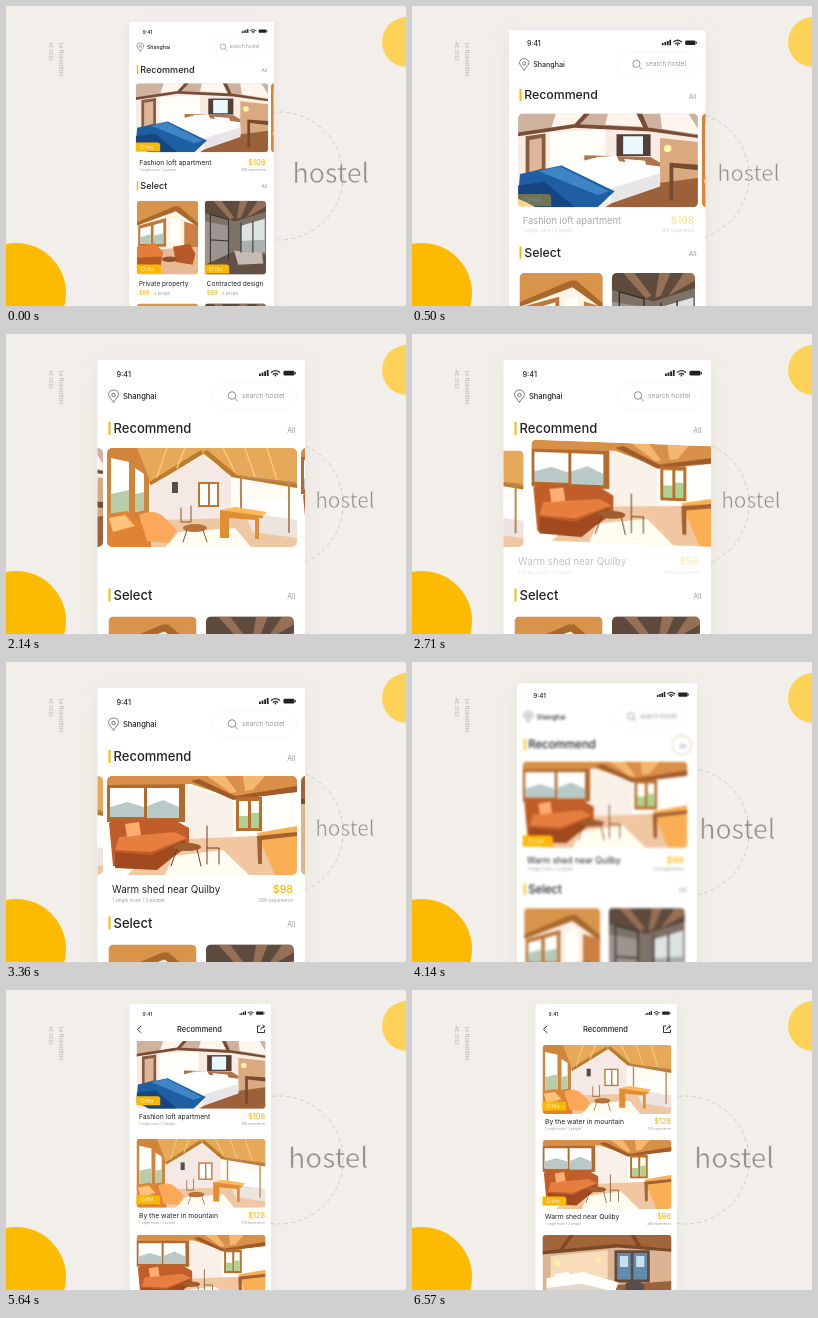
An HTML page for the animation above (7 s loop, 400 by 300 pixels).

```html
<!DOCTYPE html>
<html lang="en">
<head>
<meta charset="utf-8">
<title>Hostel app</title>
<style>
html, body { margin: 0; width: 100%; height: 100%; overflow: hidden; background: #f2efea; }
svg { display: block; width: 400px; height: 300px; font-family: Inter, sans-serif; fill: #222; }
.light { font-family: "Noto Sans CJK SC", "Noto Sans CJK JP", "Noto Sans CJK", "Noto Sans", sans-serif; font-weight: 300; fill: #938f8a; }
#word { stroke: #f2efea; stroke-width: .55px; }
.head { font-size: 13px; font-weight: 500; }
.mute { fill: #999; }
.gold { fill: #fbb800; }
.price { fill: #fbb800; font-weight: 500; }
.end { text-anchor: end; }
.line { fill: none; stroke: #333; stroke-linecap: round; stroke-linejoin: round; }
.photo { filter: blur(.6px) brightness(1.1) saturate(1.1); }
</style>
</head>
<body>
<svg viewBox="0 0 400 300">
<defs>
  <clipPath id="screen"><rect x="91.5" y="26" width="207.5" height="460" rx="2"/></clipPath>
  <clipPath id="wide"><rect width="190" height="99" rx="5"/></clipPath>
  <clipPath id="tall"><rect width="88" height="106" rx="5"/></clipPath>
  <clipPath id="listArea"><rect x="120" y="51" width="150" height="260"/></clipPath>

  <g id="bedroom">
    <path fill="#e0d6cf" d="M0 0H190V99H0z"/>
    <path fill="#b9a292" d="M0 0H190V24L140 16 60 12 0 22z"/>
    <path fill="#e6dfd9" d="M40 0H70L62 11 35 15zM95 0H125L132 14 92 12zM150 0H180L190 16V22L152 16z"/>
    <path fill="#6b4733" d="M70 0H76L64 13H58zM125 0H131L138 16H133zM0 20L60 11 140 15 190 23V26L140 19 60 15 0 24z"/>
    <path fill="#ece6e1" d="M34 20L92 17V48L34 56z"/>
    <path fill="#7a543c" d="M8 24L29 21V62L8 68z"/>
    <path fill="#c6a68e" d="M12 28L25 26V58L12 62z"/>
    <path fill="#4a3a33" d="M104 22H140V45H104z"/>
    <path fill="#d5e1e6" d="M111 24H132V43H111z"/>
    <path fill="#c39a78" d="M150 26L190 30V99H150z"/>
    <path fill="#8a5938" d="M128 76L190 68V99H92z"/>
    <path fill="#9b6a49" d="M70 44L140 46 150 52V62L70 52z"/>
    <path fill="#f1efee" d="M38 58L80 47 150 56V76L98 94 60 70z"/>
    <path fill="#d2d0d2" d="M98 79L150 63V77L98 95z"/>
    <path fill="#fff" d="M82 46L104 45 108 53 86 54zM112 48L134 50 136 58 116 56z"/>
    <path fill="#20568f" d="M2 64L46 55 102 82 84 99H18L0 88z"/>
    <path fill="#173f70" d="M0 76L28 72 60 99H20L0 90z"/>
    <path fill="#3d78ae" d="M22 61L44 56 96 82 84 86z"/>
    <path fill="#68452f" d="M160 52L190 54V60L164 57V92H160z"/>
    <circle cx="158" cy="37" r="4" fill="#ffe0a0"/>
  </g>

  <g id="studio">
    <path fill="#ece5df" d="M0 0H190V99H0z"/>
    <path fill="#cc9a58" d="M18 0H190V38L124 27 96 6 44 36 30 20z"/>
    <path fill="#a6712f" d="M96 4L100 2 130 27 190 36V40L124 29zM96 6L44 38 42 34 94 2z"/>
    <path class="line" style="stroke:#dfb674;stroke-width:1.5" d="M60 0L50 29M78 0L70 20M116 0L128 24M138 0L148 29M160 0L170 32"/>
    <path fill="#b97a3c" d="M0 0H30L42 30V74H0z"/>
    <path fill="#edf3f3" d="M4 10L22 14V68L4 72zM28 20L37 26V62L28 64z"/>
    <path fill="#a9b99c" d="M4 46L22 42V68L4 72zM28 46L37 44V62L28 64z"/>
    <path fill="#ddd4d0" d="M44 37L96 8 124 28V70L44 74z"/>
    <path fill="#a66c37" d="M91 34H112V59H91z"/>
    <path fill="#e6eff1" d="M93 36H101V57H93zM103 36H110V57H103z"/>
    <path fill="#4f4742" d="M65 34H71V45H65z"/>
    <path fill="#d6b698" d="M54 72L190 68V99H40z"/>
    <path fill="#efe5dc" d="M72 84L128 80 144 99H58z"/>
    <path fill="#f1edeb" d="M136 53L190 50V88L146 82z"/>
    <path fill="#d6cfcb" d="M136 64L190 72V90L146 84z"/>
    <path class="line" style="stroke:#a77b52;stroke-width:2" d="M134 28V62M182 34V84M134 29L188 35"/>
    <path fill="#c78237" d="M113 62L156 66V70L152 70V91H148V72L122 70V90H113z"/>
    <path fill="#e0a95e" d="M113 62L128 59 160 64 156 68z"/>
    <path fill="#c57838" d="M0 66L20 63 33 74 44 80V99H0z"/>
    <path fill="#df9a59" d="M32 67Q48 60 58 70L70 82 62 95 40 93z"/>
    <path fill="#eab277" d="M2 70L18 67 28 78 6 84z"/>
    <ellipse cx="88" cy="80" rx="12" ry="4" fill="#a2693b"/>
    <path class="line" style="stroke:#7d4d2b" d="M80 82L76 94M96 82L100 94M74 60V74H84V58"/>
  </g>

  <g id="lounge">
    <path fill="#efe9e5" d="M0 0H190V99H0z"/>
    <path fill="#bf8348" d="M0 0H190V16L126 22 84 8 0 10z"/>
    <path fill="#8d542a" d="M84 5L92 3 128 20 190 10V16L126 24z"/>
    <path fill="#d9a76e" d="M100 0H118L130 16 124 17zM136 0H158L146 14 138 15z"/>
    <path fill="#9e622f" d="M0 9L78 8V46H0z"/>
    <path fill="#e9f1f6" d="M3 12H37V41H3zM40 12H72V42H40z"/>
    <path fill="#a9b6b5" d="M3 31L20 26 37 31V41H3zM40 30L56 24 72 31V42H40z"/>
    <path fill="#e2dad4" d="M78 8L126 24V64H78z"/>
    <path fill="#a4642f" d="M129 21H155V55H129z"/>
    <path fill="#e6f0e4" d="M132 25H141V52H132zM144 25H152V52H144z"/>
    <path fill="#9fbd88" d="M132 40H141V52H132zM144 37H152V52H144z"/>
    <path fill="#d8b597" d="M60 64L190 58V99H20z"/>
    <path fill="#f1e6da" d="M66 80L116 74 142 99H58z"/>
    <path fill="#a9562a" d="M2 47Q12 41 26 44L66 43 82 52V70L50 92 6 90z"/>
    <path fill="#c97440" d="M12 61L68 56 80 62 44 76 8 74z"/>
    <path fill="#8c4421" d="M8 76L44 79 78 64V71L50 94 8 92z"/>
    <path fill="#e1a06b" d="M18 48L32 46 34 59 20 61z"/>
    <path fill="#dfa055" d="M150 57L190 50V99H168z"/>
    <path fill="#8f5a32" d="M150 60L190 56V60L155 64V88H151z"/>
    <ellipse cx="80" cy="71" rx="14" ry="4" fill="#8c5630"/>
    <path class="line" style="stroke:#5f3921" d="M70 73L64 90M90 73L94 90M100 50V72H112V88M100 72V88"/>
  </g>

  <g id="cabin">
    <path fill="#c4a488" d="M0 0H190V99H0z"/>
    <path fill="#8e5d38" d="M0 0H190V22L110 16 0 26z"/>
    <path fill="#6c4327" d="M0 23L110 13 190 20V24L110 18 0 28zM40 0H46L30 22H24zM130 0H136L146 17H140z"/>
    <path fill="#dfc8ae" d="M12 30L96 22V62L12 66z"/>
    <path fill="#5a4436" d="M106 22H158V68H106z"/>
    <path fill="#5b7f9b" d="M110 26H130V64H110zM134 26H154V64H134z"/>
    <path fill="#b7cbd6" d="M114 30H126V46H114zM138 30H150V46H138z"/>
    <path fill="#885a3b" d="M50 76L190 66V99H50z"/>
    <path fill="#ede8e4" d="M6 62L60 53 112 68 100 99H6z"/>
    <path fill="#cfc4bb" d="M6 76L58 70 108 82 100 99H6z"/>
    <path fill="#fff" d="M18 56L38 53 42 62 22 65z"/>
    <path fill="#4e4744" d="M122 70Q136 60 150 72V99H122z"/>
    <circle cx="22" cy="40" r="4" fill="#ffdb91"/><circle cx="82" cy="36" r="4" fill="#ffdb91"/>
  </g>

  <g id="sunny" clip-path="url(#tall)"><g class="photo">
    <path fill="#e8ddd4" d="M0 0H88V106H0z"/>
    <path fill="#c0874c" d="M0 0H88V34L56 12 0 32z"/>
    <path fill="#95602f" d="M54 8L60 8 88 32V38L56 15 0 36V31z"/>
    <path fill="#a86d39" d="M2 36L42 25V66H2z"/>
    <path fill="#e5eef0" d="M5 40L20 36V62H5zM24 35L38 31V62H24z"/>
    <path fill="#a7b7aa" d="M5 52L20 48V62H5zM24 50L38 47V62H24z"/>
    <path fill="#efe8e2" d="M48 28L62 24V62H48z"/>
    <path fill="#b27542" d="M68 30L88 36V78H68z"/>
    <path fill="#cfa98a" d="M0 72L88 66V106H0z"/>
    <path fill="#c7743a" d="M0 66L26 61 38 74 34 92 0 96z"/>
    <path fill="#9f5228" d="M0 82L36 80 34 94 0 100zM52 66L76 62 84 76 80 92 56 88z"/>
    <ellipse cx="47" cy="84" rx="11" ry="4" fill="#7e4b2b"/>
  </g></g>

  <g id="loft" clip-path="url(#tall)"><g class="photo">
    <path fill="#72685f" d="M0 0H88V106H0z"/>
    <path fill="#54443a" d="M0 0H88V16L44 30 0 18z"/>
    <path fill="#856650" d="M12 0H24L42 24 36 27zM50 0H62L52 24 46 26zM76 0H88V8L60 24z"/>
    <path fill="#8d8782" d="M0 30L34 36V84L0 96z"/>
    <path fill="#c9cdcd" d="M52 36L86 26V74L52 72z"/>
    <path fill="#9aa09f" d="M52 58L86 56V74L52 72z"/>
    <path fill="#5a4a40" d="M0 92L40 74 88 78V106H0z"/>
    <path fill="#b3aaa3" d="M42 72L82 74 84 90 48 92z"/>
    <path class="line" style="stroke:#2f2b29;stroke-width:1.5" d="M8 20V98M34 26V84M8 56L34 58M52 32V74M69 30V74M8 20L34 27"/>
  </g></g>

  <g id="tag">
    <path class="gold" d="M0 0H31Q35 0 35 4V13H0z"/>
    <circle cx="9" cy="6.5" r="2.6" fill="none" stroke="#fff" stroke-width=".8"/>
    <text x="14" y="9" font-size="6.5" fill="#fff">Hot</text>
  </g>
</defs>

<rect width="400" height="300" fill="#f2efea"/>
<circle cx="10" cy="287" r="50" fill="#fdbb00"/>
<circle cx="401" cy="36" r="25" fill="#fed157"/>
<g class="light" style="fill:#b5b1ac" font-size="5.6">
  <text transform="translate(52.800 36) rotate(90)">14 November</text>
  <text transform="translate(42.600 36) rotate(90)" font-size="5.2">AE 2019</text>
</g>
<circle cx="273" cy="170" r="64" fill="none" stroke="#c6c2bd" stroke-width=".8" stroke-dasharray="4 3"/>
<text id="word" class="light">hostel</text>

<g id="phone">
  <rect x="91" y="30" width="208" height="460" fill="#d9d3cb" opacity=".5" style="filter:blur(10px)"/>
  <g clip-path="url(#screen)">
    <rect x="91" y="26" width="209" height="460" fill="#fff"/>
    <g id="home">
      <path class="line" style="stroke:#555;stroke-width:.8" d="M107.500 68Q102.500 62.500 102.500 60.500A5 4.500 0 0 1 112.500 60.500Q112.500 62.500 107.500 68z"/>
      <circle cx="107.500" cy="61" r="1.700" fill="none" stroke="#555" stroke-width=".8"/>
      <text x="117" y="65" font-size="7.500" font-weight="500">Shanghai</text>
      <rect x="205.500" y="49" width="85" height="26" rx="13" fill="#fff" stroke="#f8f8f8"/>
      <circle cx="226" cy="61.500" r="3.800" fill="none" stroke="#777" stroke-width=".8"/>
      <path class="line" style="stroke:#777;stroke-width:.8" d="M229 64.500L231.500 67"/>
      <text class="mute" x="236" y="64" font-size="6.700">search hostel</text>
      <circle id="tap" cx="284.500" cy="95" r="11" fill="#fff" stroke="#eadfc9" stroke-width="1.500"/>
      <g id="heads"></g>
      <g id="slides"></g>
      <g id="captions"></g>
      <g id="select"></g>
    </g>
    <g id="detail" transform="scale(1.470588) translate(-61.420 3.436)">
      <rect x="120" y="10" width="150" height="300" fill="#fff"/>
      <g id="list" clip-path="url(#listArea)"></g>
      <path class="line" d="M135 36L131.500 39.300 135 42.600M254 36H251.500V42.500H258.500V40M254.500 39.500Q255 36.500 258.500 36.500M257 35L258.700 36.500 257 38"/>
      <text x="193.500" y="42" font-size="7.500" font-weight="500" text-anchor="middle">Recommend</text>
    </g>
    <g id="status">
      <text x="110.500" y="43" font-size="7.300" font-weight="500">9:41</text>
      <path d="M253 39.500H254.800V42H253zM255.600 38.500H257.400V42H255.600zM258.200 37.300H260V42H258.200zM260.800 36H262.600V42H260.800z"/>
      <path class="line" style="stroke-width:1.400" d="M265.500 38.300Q269.500 35 273.500 38.300M267.300 40.200Q269.500 38.500 271.700 40.200"/>
      <circle cx="269.500" cy="41.500" r=".9"/>
      <rect x="277.500" y="36.800" width="11" height="4.800" rx="1.300"/><rect x="289" y="38.200" width="1" height="2"/>
    </g>
  </g>
</g>
</svg>

<script>
const $ = id => document.getElementById(id);
const rooms = [
  ["bedroom", "Fashion loft apartment", "$108", "388"],
  ["studio", "By the water in mountain", "$128", "374"],
  ["lounge", "Warm shed near Quilby", "$98", "268"],
  ["cabin", "Quiet cabin on the hill", "$118", "296"]
];
const photo = id => `<g clip-path="url(#wide)"><g class="photo"><use href="#${id}"/></g></g>`;
const caption = ([, name, price, count], x, right, y, size) => `
  <text x="${x}" y="${y}" font-size="${size}">${name}</text>
  <text class="price end" x="${right}" y="${y}" font-size="${size * 1.08}">${price}</text>
  <g class="mute" font-size="${size * .48}">
    <text x="${x}" y="${y + size * .88}">1 single room / 2 people</text>
    <text class="end" x="${right}" y="${y + size * .88}">${count} experience</text>
  </g>`;
const heading = (name, y) => `
  <rect class="gold" x="102.500" y="${y - 11}" width="2" height="13"/>
  <text class="head" x="107.500" y="${y}">${name}</text>
  <text class="mute end" x="289.500" y="${y - .5}" font-size="7">All</text>`;
const stay = (id, name, x) => `
  <use href="#${id}" x="${x}" y="282.500"/>
  <use href="#tag" x="${x}" y="374"/>
  <text x="${x + 3}" y="405" font-size="9.300">${name}</text>
  <text class="price" x="${x + 3}" y="418" font-size="8">$88</text>
  <text class="mute" x="${x + 25}" y="417.500" font-size="5.500">4 people</text>
  <use href="#${id}" x="${x}" y="430"/>`;

$("heads").innerHTML = heading("Recommend", 99) + heading("Select", 265.5);
$("slides").innerHTML = rooms.map(r => `<g>${photo(r[0])}<use class="hot" href="#tag" y="85"/></g>`).join("");
$("captions").innerHTML = rooms.slice(0, 3).map(r => `<g>${caption(r, 106, 287, 231, 9.8)}</g>`).join("");
$("select").innerHTML = stay("sunny", "Private property", 102.5) + stay("loft", "Contracted design", 200);
$("list").innerHTML = rooms.map(r => `<g>
  <g transform="translate(130.500 55) scale(.679 .697)">${photo(r[0])}<use href="#tag" y="81"/></g>
  ${caption(r, 133, 259, 134.5, 6.75)}</g>`).join("");

const ramp = (t, a, b) => Math.min(1, Math.max(0, (t - a) / (b - a)));
const inOut = (u, n = 2) => u < .5 ? 2 ** (n - 1) * u ** n : 1 - (2 - 2 * u) ** n / 2;
const out = u => 1 - (1 - u) ** 4;
const bump = u => Math.sin(Math.PI * u);
const blur = (id, r) => $(id).style.filter = r > .05 ? `blur(${r}px)` : "";

function camera(t) {
  const late = t > 2000;
  const zoomOut = ramp(t, 3850, 4490);
  const p = late ? inOut(zoomOut) : .947 * (1 - inOut(ramp(t, 30, 700)));
  const w = late ? inOut(ramp(t, 3850, 4270)) : .84 * (1 - inOut(ramp(t, 30, 700)));
  const s = 1 - .32 * p, shift = late ? p : 0;
  $("phone").setAttribute("transform",
    `translate(${196 * (1 - s) - 1.3 * shift} ${-7.3 * (1 - s) - 1.1 * shift}) scale(${s})`);
  $("home").setAttribute("transform", `translate(${-7 * shift} ${6 * shift})`);
  blur("home", bump(zoomOut) * 1.1);
  const word = $("word");
  word.setAttribute("x", 309.2 - 27 * w);
  word.setAttribute("y", 174 + 4 * w);
  word.setAttribute("font-size", 20.8 + 7.2 * w);
}

function carousel(t) {
  const pos = out(ramp(t, 555, 1705)) + out(ramp(t, 2190, 3360));
  const d = 194 * (Math.ceil(pos) - pos);
  const q = Math.min(1, (d / 40) ** .6, (194 - d) / 40);
  const chosen = ramp(t, 3860, 4140);
  const show = [
    1 - ramp(t, 350, 600),
    ramp(t, 1000, 1300) - ramp(t, 1900, 2130),
    ramp(t, 2630, 2930)
  ];
  const tags = [show[0], 0, chosen, 0];
  [...$("slides").children].forEach((g, i) => {
    const entering = i >= pos;
    const k = entering ? .06 * q : 0, sy = 1 + (entering ? .028 : -.04) * q;
    const x = 101 + 194 * (i - pos) - (entering ? 0 : 6 * q);
    g.setAttribute("transform",
      `matrix(1 ${k} 0 1 0 ${-298 * k}) translate(${x} ${215 - 101 * sy}) scale(1 ${sy})`);
    g.setAttribute("opacity", i === 2 ? 1 : 1 - chosen);
    g.querySelector(".hot").setAttribute("opacity", tags[i]);
  });
  blur("slides", q * .6);
  [...$("captions").children].forEach((g, i) => g.setAttribute("opacity", show[i]));
}

function detail(t) {
  $("tap").setAttribute("opacity", ramp(t, 3860, 4000) - ramp(t, 4250, 4400));
  $("detail").setAttribute("opacity", ramp(t, 4250, 4480));
  const rise = 60 * (1 - out(ramp(t, 4250, 4710)));
  [...$("list").children].forEach((g, i) => {
    const start = 5310 + 80 * i;
    const y = 95 * (i - inOut(ramp(t, start, start + 1030), 5)) + rise;
    g.setAttribute("transform", `translate(0 ${y})`);
  });
}

function draw() {
  const t = performance.now() % 7000;
  camera(t);
  carousel(t);
  detail(t);
  requestAnimationFrame(draw);
}
draw();
</script>
</body>
</html>
```
